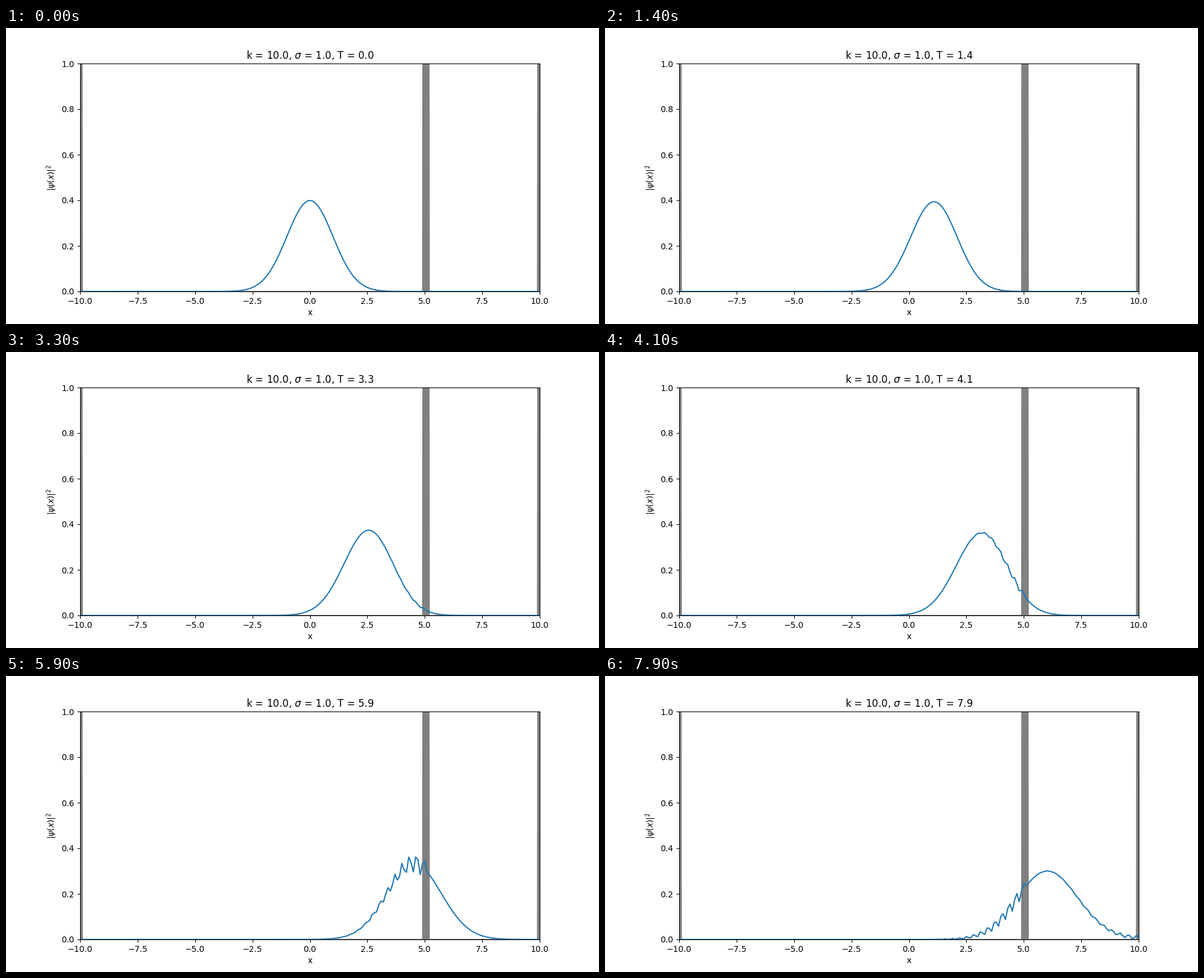
Write a matplotlib script that moves like this. It is 1000 px wide and 500 px high and loops after 8000 ms.

```python
import numpy as np
import matplotlib.pyplot as plt
from matplotlib.animation import FuncAnimation

K, SIGMA = 10.0, 1.0      # wave number and width of the packet
N, DT, STEPS = 201, 0.1, 80
V0 = 10.0                 # height of walls and barrier

x = np.linspace(-10, 10, N)
dx = x[1] - x[0]

V = np.zeros(N)
V[[0, -1]] = V0
V[150:152] = V0


def evolve():
    """Probability density at every step, by the Crank-Nicolson scheme."""
    eye = np.eye(N)
    lap = (np.eye(N, k=1) + np.eye(N, k=-1) - 2 * eye) / dx**2
    half = 0.5j * DT * (np.diag(V) - lap)
    step = np.linalg.solve(eye + half, eye - half)
    psi = np.exp(-x**2 / (4 * SIGMA**2) + 1j * K * x)
    psi /= (2 * np.pi * SIGMA**2) ** 0.25
    dens = []
    for _ in range(STEPS):
        dens.append(np.abs(psi) ** 2)
        psi = step @ psi
    return dens


density = evolve()

fig, ax = plt.subplots(figsize=(10, 5), dpi=100)
ax.fill_between(x, V, color="gray")
line, = ax.plot(x, density[0], color="#1f77b4")
ax.set_xlim(-10, 10)
ax.set_ylim(0, 1)
ax.set_xlabel("x")
ax.set_ylabel(r"$|\psi(x)|^2$")
title = ax.set_title("")


def update(i):
    line.set_ydata(density[i])
    title.set_text(rf"k = {K}, $\sigma$ = {SIGMA}, T = {i * DT:.1f}")
    return line, title


anim = FuncAnimation(fig, update, frames=STEPS, interval=100,
                     repeat=True, repeat_delay=0)
plt.show()
```
